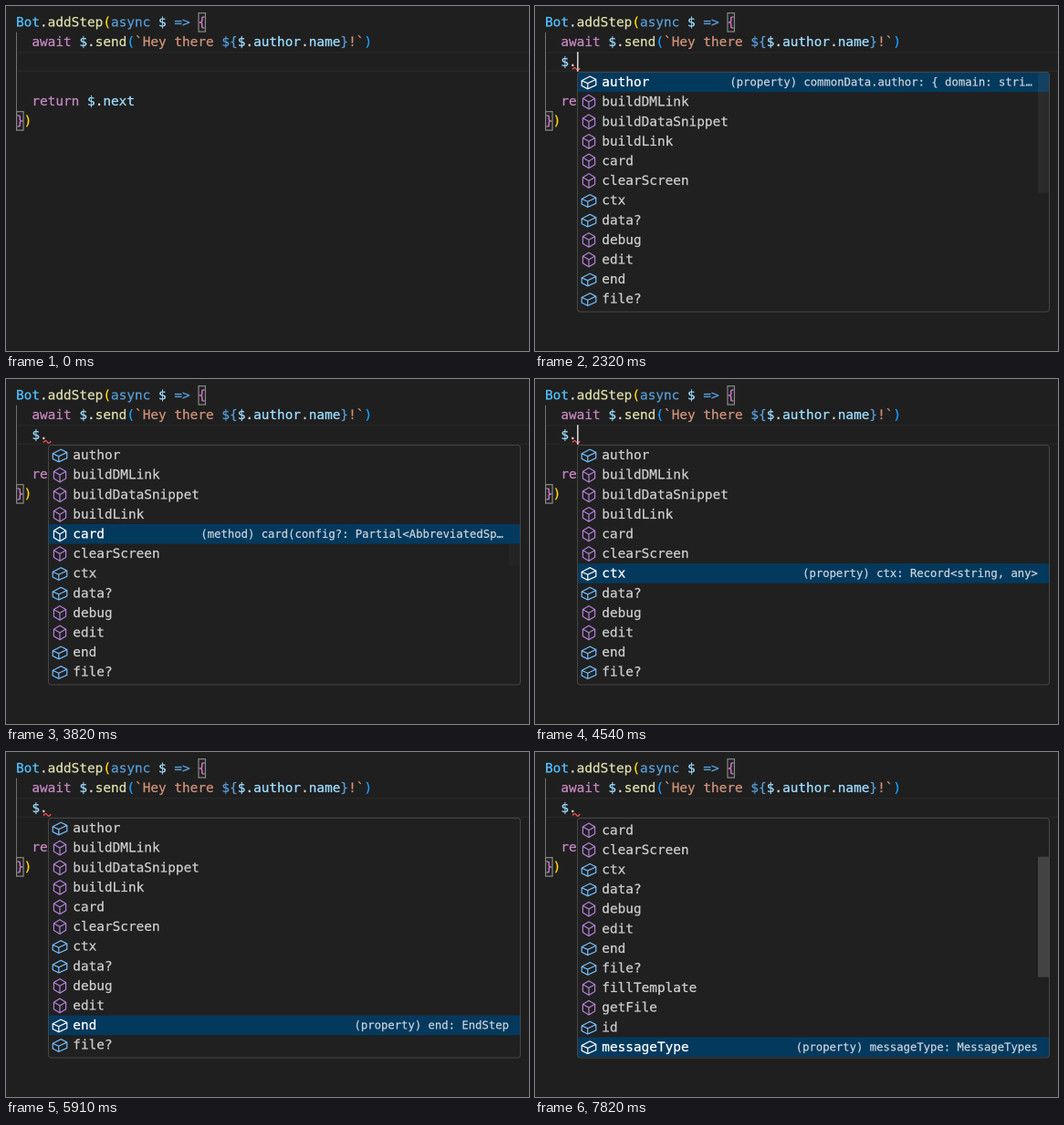
An HTML page with a canvas that plays this animation: 573x378 px, repeating every 8 s.

```html
<!DOCTYPE html>
<html lang="en">
<head>
<meta charset="utf-8">
<title>Editor autocomplete</title>
<style>
html, body { margin: 0; width: 100%; height: 100%; overflow: hidden; background: #1f1f1f; }
canvas { display: block; width: 573px; height: 378px; }
</style>
</head>
<body>
<canvas id="stage"></canvas>
<script>
const W = 573, H = 378, LOOP = 8000;
const FONT = '"DejaVu Sans Mono", "Liberation Mono", monospace';
const SIZE = 14.4, SMALL = 12.24;
const CH = SIZE * 0.602, CH_SMALL = SMALL * 0.602;
const ROW = 21.6, LEFT = 11, TOP = 7.1, BASE = 15.5;
const LIST_TOP = 72.6, LIST_H = 261.4, THUMB_H = 132;

// Double resolution lets text sit between whole pixels.
const canvas = document.getElementById('stage');
const ctx = canvas.getContext('2d');
const scale = 2 * (window.devicePixelRatio || 1);
canvas.width = W * scale;
canvas.height = H * scale;

const C = {
  name: '#4fc1ff', variable: '#9cdcfe', fn: '#dcdcaa', key: '#569cd6', flow: '#c586c0',
  string: '#ce9178', plain: '#d4d4d4', gold: '#ffd700', pink: '#da70d6', blue: '#179fff'
};

const CODE = [
  [0, 0, [['Bot', C.name], ['.', C.plain], ['addStep', C.fn], ['(', C.gold], ['async ', C.key],
    ['$ ', C.variable], ['=> ', C.key], ['{', C.pink]]],
  [1, 2, [['await ', C.flow], ['$', C.variable], ['.', C.plain], ['send', C.fn], ['(', C.blue],
    ['`Hey there ', C.string], ['${', C.key], ['$', C.variable], ['.', C.plain], ['author', C.variable],
    ['.', C.plain], ['name', C.variable], ['}', C.key], ['!`', C.string], [')', C.blue]]],
  [4, 2, [['return ', C.flow], ['$', C.variable], ['.', C.plain], ['next', C.variable]]],
  [5, 0, [['}', C.pink], [')', C.gold]]]
];

const ITEMS = [
  ['author', 'property', 'commonData.author: { domain: stri…'],
  ['buildDMLink', 'method', 'buildDMLink(): string'],
  ['buildDataSnippet', 'method', 'buildDataSnippet(data: any, type?:…'],
  ['buildLink', 'method', 'buildLink(path?: string): string'],
  ['card', 'method', 'card(config?: Partial<AbbreviatedSp…'],
  ['clearScreen', 'method', 'clearScreen(): Promise<void>'],
  ['ctx', 'property', 'ctx: Record<string, any>'],
  ['data?', 'property', 'data?: any'],
  ['debug', 'method', 'debug(): DebugInfo'],
  ['edit', 'method', 'edit(message: string): Promise<voi…'],
  ['end', 'property', 'end: EndStep'],
  ['file?', 'property', 'file?: FileInfo'],
  ['fillTemplate', 'method', 'fillTemplate(utterances: string[], …'],
  ['getFile', 'method', 'getFile(): Promise<Buffer>'],
  ['id', 'property', 'id: string'],
  ['messageType', 'property', 'messageType: MessageTypes']
];
const FIRST = [['$', 'parameter', '$: BotContext']];

// Times at which the selection moves down and the caret toggles.
const MOVES = [2560, 2980, 3280, 3640, 4240, 4540, 4840, 5140, 5550, 5910, 6270, 6680, 6980, 7340, 7760];
const BLINKS = [170, 650, 830, 1840, 2320, 2860, 3340, 3820, 4360, 4840, 5310, 5850, 6320, 6800, 7340, 7820];
const passed = (times, t) => times.filter(x => x <= t).length;

function rect(x, y, w, h, color) {
  ctx.fillStyle = color;
  ctx.fillRect(x, y, w, h);
}

// A hairline stroke gives the glyphs a slightly heavier weight.
function text(s, x, y, color, size = SIZE) {
  ctx.font = size + 'px ' + FONT;
  ctx.fillStyle = ctx.strokeStyle = color;
  ctx.lineWidth = size * 0.018;
  ctx.fillText(s, x, y);
  ctx.strokeText(s, x, y);
}

function line(points, color, close = false) {
  ctx.beginPath();
  points.forEach(([x, y]) => ctx.lineTo(x, y));
  if (close) ctx.closePath();
  ctx.strokeStyle = color;
  ctx.lineWidth = 1;
  ctx.stroke();
}

function bracketBox(row, col) {
  const x = LEFT + col * CH, y = TOP + row * ROW;
  rect(x, y, CH, ROW, 'rgba(0,100,0,0.1)');
  ctx.strokeStyle = '#888888';
  ctx.lineWidth = 1.2;
  ctx.strokeRect(x + 0.6, y + 0.6, CH - 1.2, ROW - 1.2);
}

function codeLine(row, col, parts) {
  let x = LEFT + col * CH;
  for (const [s, color] of parts) {
    text(s, x, TOP + row * ROW + BASE, color);
    x += s.length * CH;
  }
}

function icon(method, x, y, color) {
  ctx.save();
  ctx.translate(x, y);
  ctx.scale(1.2, 1.2);
  ctx.lineJoin = 'round';
  if (method) {
    line([[0, -6.6], [5.5, -3.3], [5.5, 3.1], [0, 6.4], [-5.5, 3.1], [-5.5, -3.3]], color, true);
    line([[-5.5, -3.3], [0, -0.2], [5.5, -3.3]], color);
    line([[0, -0.2], [0, 6.4]], color);
  } else {
    line([[1, -5.5], [6.5, -2.7], [6.5, 2.5], [-1, 5.9], [-6.5, 3.1], [-6.5, -1.6]], color, true);
    line([[-6.5, -1.6], [-1, 0.8], [6.5, -2.7]], color);
    line([[-1, 0.8], [-1, 5.9]], color);
  }
  ctx.restore();
}

function listRow([label, kind, info], left, y, selected) {
  const method = kind === 'method';
  const x = left + 27.3;
  if (selected) {
    rect(left, y, 518, ROW, '#04395e');
    const detail = `(${kind}) ${info}`;
    const dx = detail.length > 44 ? left + 167.4 : left + 505 - detail.length * CH_SMALL;
    const fit = Math.floor((dx - x - 28) / CH);
    if (label.length > fit) label = label.slice(0, fit - 1) + '…';
    text(detail, dx, y + BASE - 0.5, '#c8d3dc', SMALL);
  }
  icon(method, left + 13, y + ROW / 2 + 0.3, selected ? '#ffffff' : method ? '#b180d7' : '#75beff');
  text(label, x, y + BASE, selected ? '#ffffff' : '#cccccc');
}

function popup(items, left, height, selected, scroll) {
  ctx.beginPath();
  ctx.roundRect(left + 0.5, 72.5, 517, height, 3);
  ctx.fillStyle = '#202020';
  ctx.fill();
  ctx.save();
  ctx.clip();
  items.forEach((item, i) => {
    const y = LIST_TOP + i * ROW - scroll;
    if (y > LIST_TOP - ROW && y < LIST_TOP + LIST_H) listRow(item, left, y, i === selected);
  });
  ctx.restore();
}

function border(left, height) {
  ctx.beginPath();
  ctx.roundRect(left + 0.5, 72.5, 517, height, 3);
  ctx.strokeStyle = '#454545';
  ctx.lineWidth = 1;
  ctx.stroke();
}

function thumb(top, bottom, alpha) {
  if (bottom > top) rect(551, top, 12, bottom - top, `rgba(121,121,121,${alpha})`);
}

function scrollbar(t, selected, scroll) {
  if (scroll > 0) {
    const y = LIST_TOP + scroll / 2;
    thumb(y, y + THUMB_H, t < 6740 ? 0.2 : 0.4);
    return;
  }
  const end = LIST_TOP + THUMB_H;
  const edge = LIST_TOP + (selected + 1) * ROW;
  if (selected === 0) thumb(LIST_TOP, edge, t < 2140 ? 0.2 : 0.12);
  thumb(edge, end, selected < 2 ? 0.12 : 0.04);
}

function squiggle() {
  ctx.beginPath();
  ctx.moveTo(41, 69.6);
  ctx.bezierCurveTo(42.6, 67, 43.8, 67, 45.2, 69);
  ctx.bezierCurveTo(46.4, 70.8, 47.6, 70.6, 49.2, 68);
  ctx.strokeStyle = '#f14c4c';
  ctx.lineWidth = 1.3;
  ctx.stroke();
}

function currentLine() {
  ctx.strokeStyle = '#282828';
  ctx.lineWidth = 1.2;
  ctx.strokeRect(LEFT + 0.6, TOP + 2 * ROW + 0.6, W, ROW - 1.2);
}

function draw(t) {
  ctx.setTransform(scale, 0, 0, scale, 0, 0);
  rect(0, 0, W, H, '#1f1f1f');
  currentLine();
  rect(LEFT, TOP + ROW, 1, 4 * ROW, '#707070');
  bracketBox(0, 23);
  bracketBox(5, 0);
  CODE.forEach(args => codeLine(...args));

  const typed = t < 830 ? 0 : t < 1360 ? 1 : 2;
  if (typed > 0) codeLine(2, 2, [['$', C.variable], ['.', C.plain]].slice(0, typed));
  if (t >= 1720) squiggle();
  if (passed(BLINKS, t) % 2) {
    rect(Math.round(LEFT + (2 + typed) * CH), TOP + 2 * ROW, 1.6, ROW, '#d0d0d0');
  }

  if (typed === 2) {
    const selected = passed(MOVES, t);
    const scroll = Math.max(0, (selected + 1) * ROW - LIST_H);
    popup(ITEMS, 46, 262.5, selected, scroll);
    scrollbar(t, selected, scroll);
    border(46, 262.5);
  } else if (t >= 880) {
    popup(FIRST, 38, 25, 0, 0);
    border(38, 25);
  }
}

const start = performance.now();
function tick() {
  draw((performance.now() - start) % LOOP);
  requestAnimationFrame(tick);
}
tick();
</script>
</body>
</html>
```
